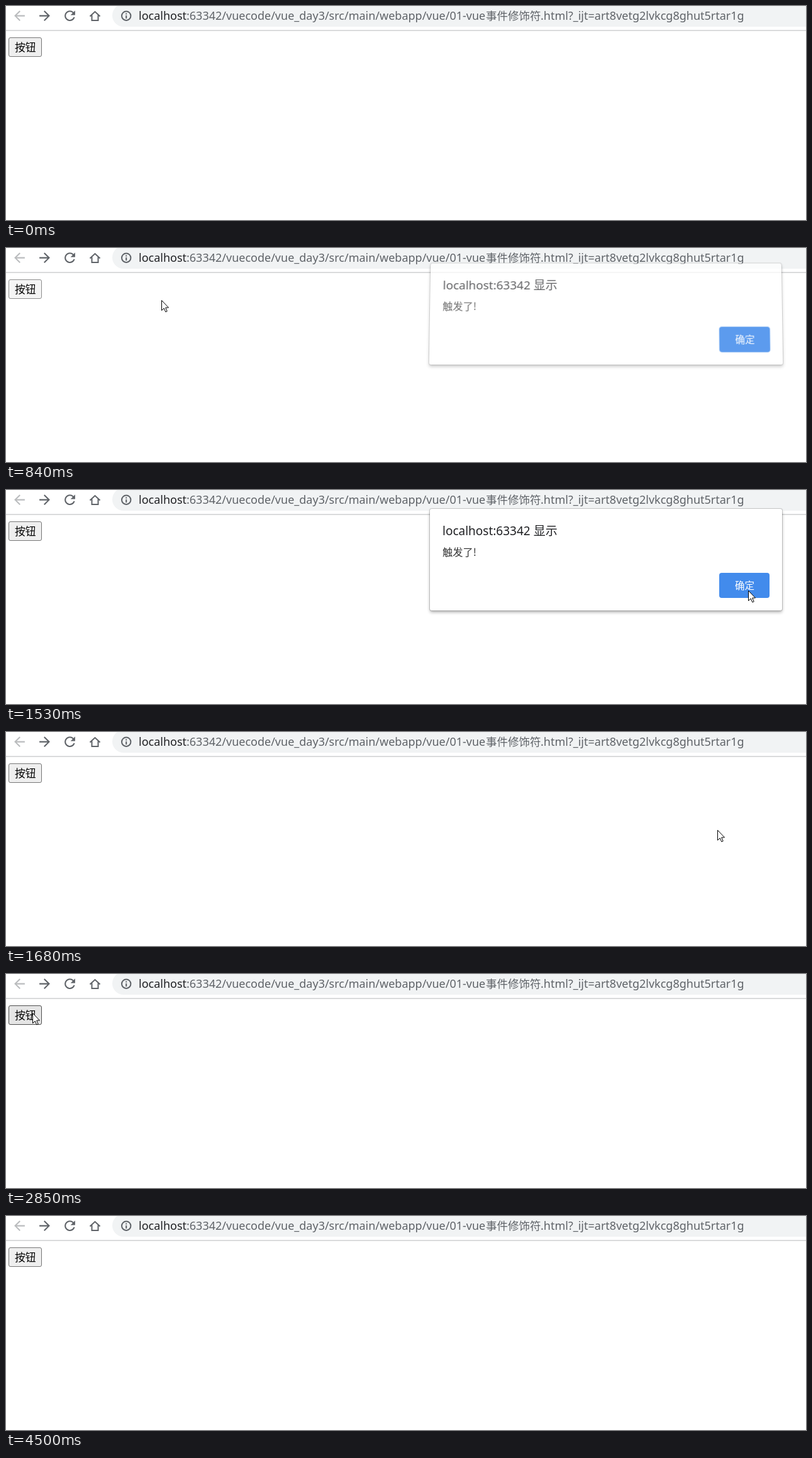
An HTML page that plays this animation: 1272 px wide and 341 px high, repeating every 4820 ms.

```html
<!DOCTYPE html>
<html lang="zh-CN">
<head>
<meta charset="utf-8">
<title>vue事件修饰符</title>
<style>
  html, body { margin: 0; width: 100%; height: 100%; overflow: hidden; background: #fff; }
  svg { position: absolute; left: 0; top: 0; }
  text { font-family: "Noto Sans", "Noto Sans CJK SC", "Noto Sans CJK", sans-serif; }
  .cjk { font-family: "Noto Sans CJK SC", "Noto Sans CJK", sans-serif; }
  #btn rect { fill: #efefef; stroke: #767676; }
  #btn.hover rect { fill: #e5e5e5; stroke: #4f4f4f; }
  #btn.down rect { fill: #f5f5f5; stroke: #8d8d8d; }
  #dialog {
    position: absolute; left: 674px; top: 30px; width: 560px; height: 162px;
    background: #fff; border-radius: 3px;
    box-shadow: 0 0 0 1px rgba(0, 0, 0, .17), 0 3px 5px rgba(0, 0, 0, .3);
  }
  #ok { fill: #1a73e8; stroke: rgba(26, 115, 232, .3); stroke-width: 2; }
  #ok.hover { fill: #428bec; stroke: none; }
</style>
</head>
<body>
<svg width="1272" height="341">
  <rect x="169" y="-3" width="1140" height="36" rx="18" fill="#f1f3f4"/>
  <rect y="38" width="1272" height="2" fill="#dadbdc"/>
  <g fill="#5f6368">
    <path fill="#babcbe" transform="translate(34.1 3) scale(-1.05 1.05)" d="M12 4l-1.4 1.4 5.6 5.6H4v2h12.2l-5.6 5.6L12 20l8-8z"/>
    <path transform="translate(48.9 3) scale(1.05)" d="M12 4l-1.4 1.4 5.6 5.6H4v2h12.2l-5.6 5.6L12 20l8-8z"/>
    <path transform="translate(88.9 3) scale(1.05)" d="M17.65 6.35A8 8 0 0 0 12 4a8 8 0 1 0 7.73 10h-2.08A6 6 0 1 1 12 6c1.66 0 3.14.69 4.22 1.78L13 11h7V4z"/>
    <path d="M190.2 15h2v5h-2zM190.2 11.5h2v2h-2z"/>
  </g>
  <g fill="none" stroke="#5f6368" stroke-width="2">
    <path d="M133.5 16.5L141.5 9l8 7.5M136.5 14.5V23h10v-8.500"/>
    <circle cx="191.200" cy="15.700" r="7.200"/>
  </g>
  <text y="22" font-size="18" fill="#5f6368"><tspan x="211" fill="#202124">localhost</tspan><tspan x="287">:63342/vuecode/vue_day3/src/main/webapp/vue/01-vue</tspan><tspan x="763" class="cjk" font-size="17.5">事件修饰符</tspan><tspan x="850">.html?_ijt=art8vetg2lvkcg8ghut5rtar1g</tspan></text>
  <g id="btn">
    <rect x="4.500" y="50.500" width="52" height="30" rx="2.500"/>
    <text class="cjk" x="14" y="72" font-size="16.8">按钮</text>
  </g>
</svg>
<div id="dialog">
  <svg width="560" height="162">
    <text x="20" y="42" font-size="19" fill="#202124">localhost:63342 显示</text>
    <text class="cjk" x="20" y="75" font-size="16.3" fill="#333">触发了!</text>
    <rect id="ok" x="460" y="102" width="80" height="40" rx="4"/>
    <text class="cjk" x="485" y="128" font-size="15.5" fill="#fff">确定</text>
  </svg>
</div>
<svg width="1272" height="341">
  <circle id="glow" cx="42" cy="62" r="15" fill="rgba(252, 240, 0, .5)"/>
  <path id="cursor" fill="#fff" stroke="#000" d="M.5.5V16.500L4.200 13l2.600 5.900 2.400-1.100L6.700 12h4.800z"/>
</svg>
<script>
  const LOOP = 4820;
  const $ = id => document.getElementById(id);
  const [btn, dialog, ok, glow, cursor] = ['btn', 'dialog', 'ok', 'glow', 'cursor'].map($);
  const clamp = v => Math.max(0, Math.min(1, v));

  const linear = u => u;
  const easeIn = u => u * u;
  const easeOut = u => u * (2 - u);
  const easeBoth = u => u < .5 ? 2 * u * u : 1 - 2 * (1 - u) ** 2;

  const bursts = [[70, 530], [600, 1070], [1140, 1600], [1680, 2140], [4020, 4500]];

  // Pointer path: [time, x, y, easing towards this point]
  const path = [
    [70, 883, 326, linear],
    [530, 42, 62, easeOut],
    [680, 42, 62, linear],
    [835, 247, 83, easeIn],
    [1500, 1180, 160, easeOut],
    [1600, 1180, 160, linear],
    [2140, 66, 72, easeBoth],
    [2220, 42, 62, linear],
    [4100, 42, 62, linear],
    [4420, 1201, 302, easeIn]
  ];

  // Mouse presses on the button: [down, up]
  const presses = [[600, 680], [2370, 2450], [2770, 2850], [3230, 3310], [3610, 3710], [4020, 4100]];

  function hold(t) {
    const burst = bursts.findLast(([start]) => t >= start);
    if (!burst) return t;
    const [start, end] = burst;
    const step = (end - start) / 6;
    const i = Math.floor((t - start + 5) / step);
    return i > 6 ? t : start + i * step;
  }

  function pointAt(t) {
    const i = path.findIndex(p => t < p[0]);
    if (i < 1) return (i ? path[path.length - 1] : path[0]).slice(1, 3);
    const [t0, x0, y0] = path[i - 1];
    const [t1, x1, y1, ease] = path[i];
    const k = ease((t - t0) / (t1 - t0));
    return [x0 + (x1 - x0) * k, y0 + (y1 - y0) * k];
  }

  function draw() {
    const now = performance.now() % LOOP;
    const t = hold(now);
    const within = ([a, b]) => now >= a && now < b;

    const [x, y] = pointAt(t).map(Math.round);
    cursor.setAttribute('transform', `translate(${x} ${y})`);
    cursor.style.display = within([70, 4495]) ? '' : 'none';

    const pressed = presses.some(within);
    const over = within([70, 4495]) && x >= 4 && x < 57 && y >= 50 && y < 81;
    glow.style.display = pressed ? '' : 'none';
    // The open alert keeps the button held down
    btn.setAttribute('class', pressed || within([600, 1140]) ? 'down' : over ? 'hover' : '');

    const shown = t < 1540 ? easeOut(clamp((t - 690) / 310)) : clamp((1640 - t) / 100);
    const away = 1 - shown;
    dialog.style.opacity = shown;
    dialog.style.transform = away
      ? `translateY(${-22 * away}px) perspective(1500px) rotateX(${17 * away}deg)` : 'none';
    ok.setAttribute('class', x >= 1134 && y >= 132 ? 'hover' : '');

    requestAnimationFrame(draw);
  }
  draw();
</script>
</body>
</html>
```
